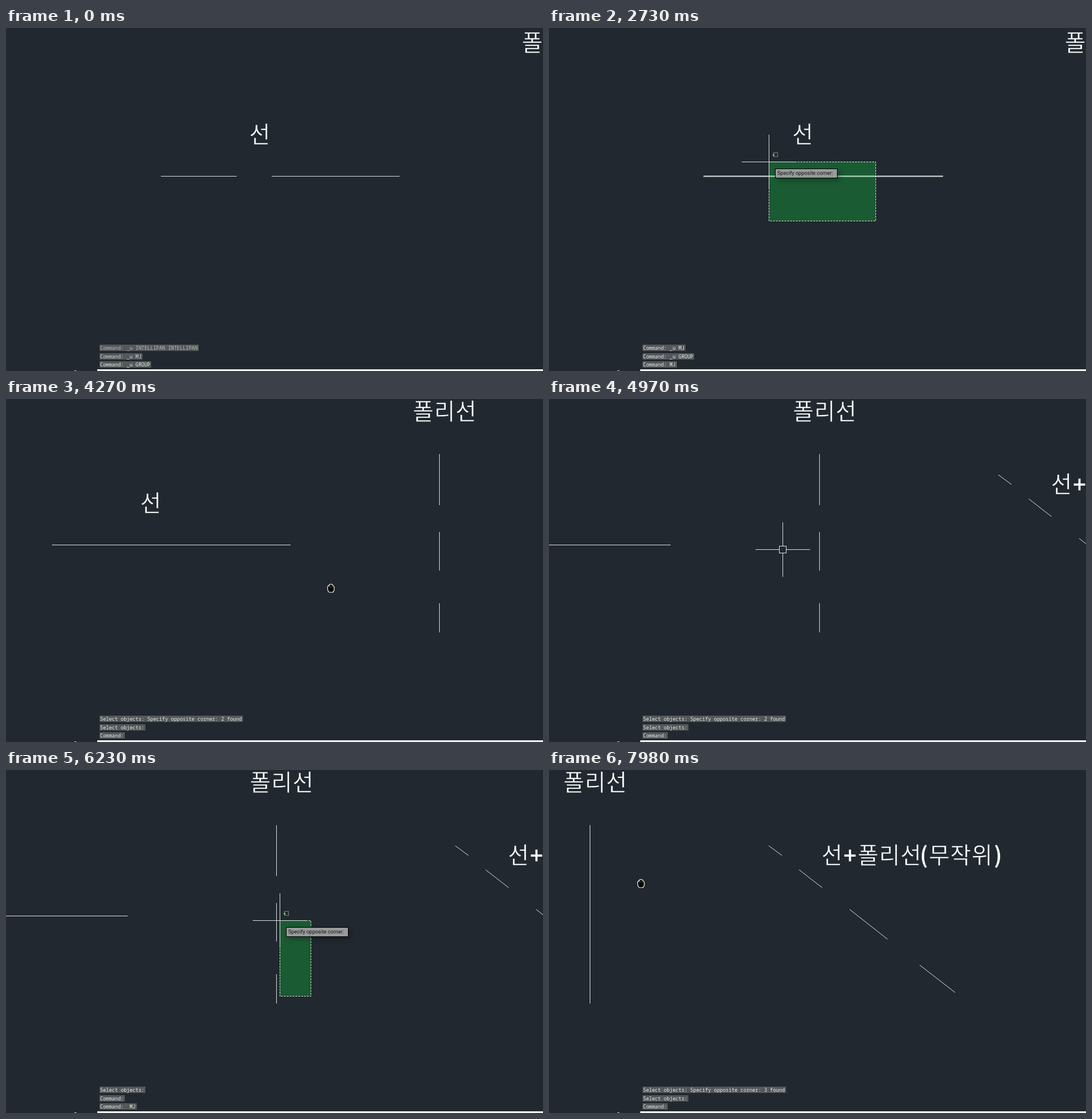
Recreate the animation shown at these times as an HTML page with a canvas. Size 936 by 598 pixels, loop 8000 ms.

```html
<!DOCTYPE html>
<html lang="ko">
<head>
<meta charset="utf-8">
<style>
html, body { margin: 0; width: 100%; height: 100%; overflow: hidden; background: #212830; }
canvas { display: block; }
</style>
</head>
<body>
<canvas id="stage" width="936" height="598"></canvas>
<script>
const ctx = document.getElementById('stage').getContext('2d');
const LOOP = 8000, STEP = 70;
const BG = '#212830', WHITE = '#fff', LINE = '#dedede';
const HANGUL = '39.6px "Noto Sans CJK KR", "Noto Sans CJK", sans-serif';
const UI = '9px Roboto, sans-serif';
const MONO = '8.58px "Noto Sans Mono", monospace';

// Keys are [time, x, y]
const panKeys = [[3780, 0, 0], [3990, -55, -1], [4270, -190, -4], [4550, -474, -4],
  [7560, -474, -4], [7980, -874, -4]];
const cursorKeys = [[630, 552, 348], [840, 551, 341], [910, 550, 340], [1050, 550, 338],
  [1960, 550, 338], [2170, 569, 336], [2240, 569, 336], [2730, 383, 233],
  [3080, 383, 233], [3360, 470, 262], [3780, 756, 334],
  [4690, 298, 328], [4970, 407, 262], [5040, 407, 262], [5320, 522, 336], [5670, 522, 336],
  [5880, 531, 394], [5950, 503, 340], [6650, 438, 144], [7070, 438, 144], [7280, 560, 198]];

const modes = [[0, 'none'], [630, 'cross'], [1960, 'pick'], [2240, 'window'], [2800, 'pick'],
  [3080, 'cross'], [3850, 'hand'], [4690, 'cross'], [5600, 'pick'], [5880, 'window'],
  [6720, 'pick'], [7140, 'cross'], [7630, 'hand']];
const typed = [[0, ''], [1540, 'm'], [1820, 'mj'], [1960, ''], [5390, 'm'], [5530, 'mj'], [5600, '']];

const SELECT = 'Select objects:', CMD = 'Command:';
const found = n => `${SELECT} Specify opposite corner: ${n} found`;
const logs = [
  [0, [CMD + ' _u INTELLIPAN INTELLIPAN', CMD + ' _u MJ', CMD + ' _u GROUP']],
  [1960, [CMD + ' _u MJ', CMD + ' _u GROUP', CMD + ' MJ']],
  [2800, [CMD + ' MJ', found(2), SELECT]],
  [3080, [found(2), SELECT, CMD]],
  [5600, [SELECT, CMD, CMD + '  MJ']],
  [6720, [CMD + '  MJ', found(3), SELECT]],
  [7140, [found(3), SELECT, CMD]]
];

const horizontal = [[270, 402], [463, 686]];
const vertical = [[100, 189], [236, 303], [360, 411]];
const diagonal = [[1257, 136, 1280, 153], [1310, 178, 1350, 209],
  [1398, 247, 1464, 299], [1520, 344, 1582, 392]];

const current = (list, t) => list.filter(e => e[0] <= t).pop()[1];

function at(keys, t) {
  if (t <= keys[0][0]) return keys[0].slice(1);
  for (let i = 1; i < keys.length; i++) {
    const [t0, x0, y0] = keys[i - 1], [t1, x1, y1] = keys[i];
    if (t <= t1) {
      const k = (t - t0) / (t1 - t0);
      return [Math.round(x0 + (x1 - x0) * k), Math.round(y0 + (y1 - y0) * k)];
    }
  }
  return keys[keys.length - 1].slice(1);
}

function rect(x, y, w, h, color) {
  ctx.fillStyle = color;
  ctx.fillRect(x, y, w, h);
}

function text(str, x, y, font, color = WHITE) {
  ctx.font = font;
  ctx.fillStyle = color;
  ctx.fillText(str, x, y);
}

// Drawing text, its strokes slimmed by an outline in the background colour
function label(str, x, y, font = HANGUL) {
  ctx.letterSpacing = '0.8px';
  text(str, x, y, font);
  ctx.strokeStyle = BG;
  ctx.lineWidth = .5;
  ctx.strokeText(str, x, y);
  ctx.letterSpacing = '0px';
}

// An axis-aligned line, optionally hovered or selected
function bar(x, y, length, upright, state, tint) {
  const strip = (pad, color) => upright
    ? rect(x - pad, y - pad, 1 + 2 * pad, length + 2 * pad, color)
    : rect(x - pad, y - pad, length + 2 * pad, 1 + 2 * pad, color);
  if (state === 'selected') strip(2, '#29517c');
  if (state) strip(1, tint ? '#70ae86' : '#8c8f92');
  strip(0, tint ? '#a5d6b4' : state ? '#d2d2d2' : LINE);
}

function drawLines(t, win, tint) {
  const hit = (x0, y0, x1, y1) => win &&
    win.x < x1 && win.x + win.w > x0 && win.y < y1 && win.y + win.h > y0;
  if (t < 3080) {
    for (const [a, b] of horizontal) {
      const state = t >= 2800 ? 'selected' : hit(a, 258, b, 259) ? 'hover' : '';
      bar(a, 258, b - a, false, state, tint);
    }
  } else bar(270, 258, 416, false);
  if (t < 7140) {
    for (const [a, b] of vertical) {
      const state = t >= 6720 ? 'selected' : hit(945, a, 946, b) ? 'hover' : '';
      bar(945, a, b - a, true, state, tint);
    }
  } else bar(945, 100, 311, true);
}

function drawWorld(t, pan, win) {
  ctx.save();
  ctx.translate(pan[0], pan[1]);
  label('선', 424, 200);
  label('폴리선', 899, 40);
  label('선', 1349, 167);
  label('+', 1387, 168, 'bold ' + HANGUL);
  label('폴리선', 1412, 167);
  label('(', 1520, 167, 'bold ' + HANGUL);
  label('무작위', 1536, 167);
  label(')', 1649, 167, 'bold ' + HANGUL);

  ctx.strokeStyle = LINE;
  ctx.lineWidth = 1;
  ctx.beginPath();
  for (const [x0, y0, x1, y1] of diagonal) {
    ctx.moveTo(x0, y0);
    ctx.lineTo(x1, y1);
  }
  ctx.stroke();

  const local = win && { x: win.x - pan[0], y: win.y - pan[1], w: win.w, h: win.h };
  drawLines(t, local, false);
  if (local) {
    rect(local.x, local.y, local.w, local.h, '#1a5b33');
    ctx.beginPath();
    ctx.rect(local.x, local.y, local.w, local.h);
    ctx.clip();
    drawLines(t, local, true);
  }
  ctx.restore();
}

function shadowed(x, y, w, h, color) {
  ctx.save();
  ctx.shadowColor = 'rgba(0,0,0,.28)';
  ctx.shadowBlur = 8;
  ctx.shadowOffsetX = ctx.shadowOffsetY = 4;
  rect(x, y, w, h, color);
  ctx.restore();
}

function tooltip(x, y, str, width) {
  shadowed(x + 11, y + 12, width, 17, '#000');
  rect(x + 12, y + 13, width - 2, 15, '#999a9b');
  text(str, x + 15, y + 23, UI, '#111');
}

function pickbox(x, y) {
  ctx.strokeStyle = LINE;
  ctx.lineWidth = 1;
  ctx.strokeRect(x - 5.5, y - 5.5, 12, 12);
}

function crosshair(x, y, hollow) {
  rect(x - 47, y, 95, 1, LINE);
  rect(x, y - 47, 1, 95, LINE);
  if (hollow) {
    rect(x - 6, y - 6, 13, 13, BG);
    pickbox(x, y);
  }
}

function drawWindow(win, x, y) {
  ctx.strokeStyle = '#e8f0ea';
  ctx.lineWidth = 1;
  ctx.setLineDash([3, 2]);
  ctx.strokeRect(win.x + .5, win.y + .5, win.w, win.h);
  ctx.setLineDash([]);
  crosshair(x, y, false);
  ctx.strokeStyle = '#ddd';
  ctx.setLineDash([1, 1]);
  ctx.strokeRect(x + 8.5, y - 15.5, 7, 7);
  ctx.setLineDash([]);
  rect(x + 7, y - 13, 3, 3, '#6fc832');
  tooltip(x, y, 'Specify opposite corner:', 109);
}

function input(x, y, str) {
  shadowed(x + 12, y + 13, 35, 13, WHITE);
  text(str, x + 15, y + 23, '10px Roboto, sans-serif', '#1c2a24');
  rect(Math.round(x + 16 + ctx.measureText(str).width), y + 14, 1, 11, '#222');
}

function arrow(x, y) {
  const shape = new Path2D('M0 0V12L3 9.3L5 14L7 13L5 8.7H9Z');
  ctx.save();
  ctx.translate(x, y);
  ctx.fillStyle = WHITE;
  ctx.strokeStyle = '#111';
  ctx.lineWidth = .7;
  ctx.fill(shape);
  ctx.stroke(shape);
  ctx.restore();
}

function hand(x, y) {
  const palm = new Path2D('M-5.5 0V-3Q-4.5 -5.5 -3 -4Q-3 -7 -1.2 -6.5Q0 -8.5 1.5 -6.5Q3.5 -7.5 3.8 -4.5Q6 -4.5 6 -1.5V3Q5 7 2.5 7H-2.5Q-5.5 5 -5.5 0Z');
  ctx.save();
  ctx.translate(x, y);
  ctx.fillStyle = '#050607';
  ctx.strokeStyle = '#f2f2f2';
  ctx.lineWidth = 1.2;
  ctx.fill(palm);
  ctx.stroke(palm);
  ctx.lineWidth = .5;
  ctx.strokeStyle = '#888';
  ctx.stroke(new Path2D('M-2.8 -4V-1M0 -5.5V-1M2.8 -4.5V-1'));
  ctx.restore();
}

function drawLog(t) {
  const fade = Math.min(1, Math.max(0, (t - 210) / 210));
  current(logs, t).forEach((line, i) => {
    const y = 552 + Math.round(i * 14.5);
    ctx.font = MONO;
    rect(163, y, Math.round(ctx.measureText(line).width) + 3, 11, '#54585a');
    const alpha = [.68, .84, 1][i];
    ctx.globalAlpha = alpha + (1 - alpha) * fade;
    text(line, 164, y + 9, MONO, '#ececec');
    ctx.globalAlpha = 1;
  });
  rect(159, 595, 777, 3, '#f1f1f1');
  rect(119, 597, 4, 1, '#c8cacc');
}

function draw(t) {
  const pan = at(panKeys, t), mode = current(modes, t);
  const [x, y] = at(cursorKeys, t);
  let win = null;
  if (mode === 'window') {
    const [cx, cy] = t < 4000 ? [569, 336] : [531, 394];
    win = { x: Math.min(x, cx), y: Math.min(y, cy), w: Math.abs(cx - x), h: Math.abs(cy - y) };
  }

  rect(0, 0, 936, 598, BG);
  drawWorld(t, pan, win);
  drawLog(t);

  if (mode === 'cross') crosshair(x, y, true);
  if (mode === 'window') drawWindow(win, x, y);
  if (mode === 'hand') {
    const grip = t < 6000 ? [756, 334] : [1034, 202];
    hand(grip[0] + pan[0], grip[1] + pan[1]);
  }
  if (mode === 'pick') {
    pickbox(x, y);
    tooltip(x, y, SELECT, 70);
  }
  const str = current(typed, t);
  if (str) input(x, y, str);
  if (t >= 1540 && t < 1820) arrow(x, y + 1);
}

function tick() {
  const t = performance.now() % LOOP;
  draw(Math.floor(t / STEP) * STEP);
  requestAnimationFrame(tick);
}
tick();
</script>
</body>
</html>
```
